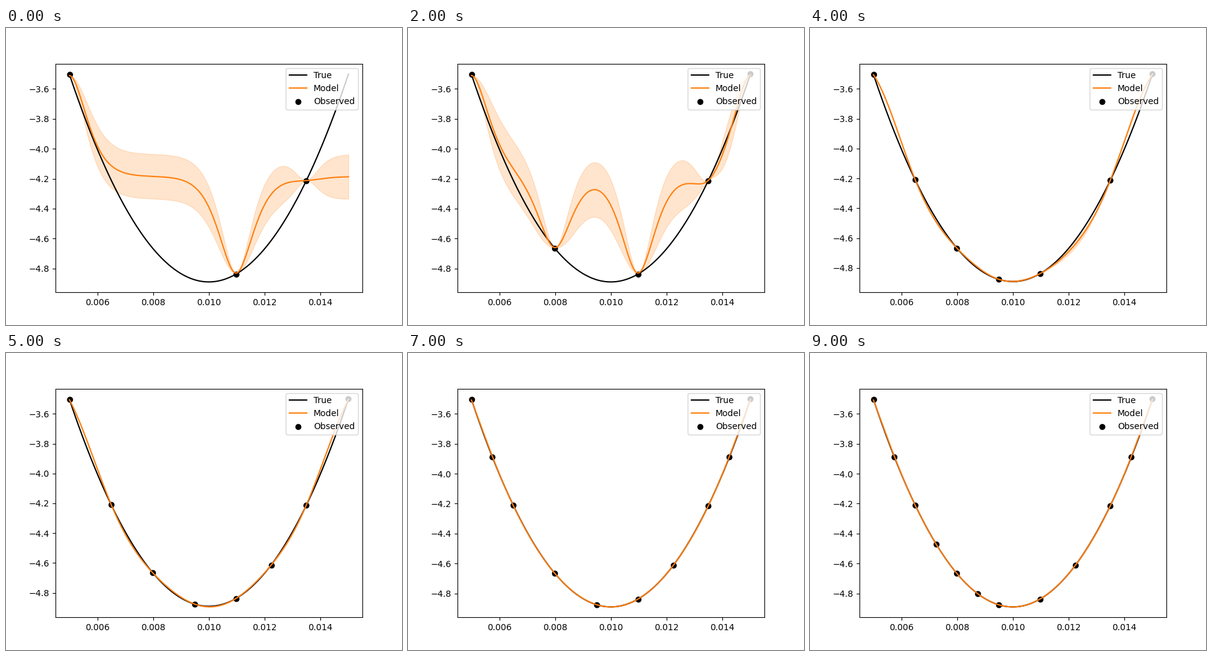
These frames come from a looping animation (640 by 480 pixels, 10 s). A matplotlib script:

```python
import numpy as np
import matplotlib.pyplot as plt
from matplotlib.animation import FuncAnimation

LOW, HIGH = 0.005, 0.015
STEPS = 10
START = 3

# first samples, as fractions of the x range
SEEDS = [0, 0.597, 0.849, 0.299, 1, 0.448]


def sample_positions(count):
    """The seeds, then the middle of the widest gap, leftmost first."""
    points = list(SEEDS)
    while len(points) < count:
        ordered = np.sort(points)
        i = np.argmax(np.round(np.diff(ordered), 6))
        points.append((ordered[i] + ordered[i + 1]) / 2)
    return np.array(points)


def to_x(u):
    return LOW + (HIGH - LOW) * u


def objective(x):
    return -4.89 + 55500 * (x - 0.009997) ** 2


def length_scale(step):
    """Short until the valley is sampled, then growing with the evidence."""
    if START + step < len(SEEDS):
        return 0.069
    return min(0.6, 0.16 * 1.4 ** (START + step - len(SEEDS)))


def matern(a, b, scale):
    s = np.sqrt(5) * np.abs(a[:, None] - b[None, :]) / scale
    return (1 + s + s * s / 3) * np.exp(-s)


def posterior(u, y, grid, scale):
    """Mean and band half-height of a Gaussian process on the grid."""
    noise = 5e-5 / scale ** 2
    dev = y - y.mean()
    k = matern(u, u, scale) + noise * np.eye(len(u))
    cross = matern(grid, u, scale)
    mean = y.mean() + cross @ np.linalg.solve(k, dev)
    var = 1 - np.sum(cross * np.linalg.solve(k, cross.T).T, axis=1)
    height = 0.1 + 0.055 * dev @ dev
    return mean, height * np.maximum(var, 0)


samples = sample_positions(START + STEPS - 1)
grid = np.linspace(0, 1, 201)
xs = to_x(grid)

fig, ax = plt.subplots(figsize=(6.4, 4.8), dpi=100)


def draw(step):
    u = samples[:START + step]
    y = objective(to_x(u))
    mean, half = posterior(u, y, grid, length_scale(step))

    ax.clear()
    ax.plot(xs, objective(xs), color="black", label="True")
    ax.plot(xs, mean, color="tab:orange", label="Model")
    ax.fill_between(xs, mean - half, mean + half, color="tab:orange", alpha=0.2)
    ax.scatter(to_x(u), y, color="black", label="Observed")
    ax.legend(loc="upper right")
    return []


anim = FuncAnimation(fig, draw, frames=STEPS, interval=1000,
                     init_func=lambda: draw(0), repeat=True)
plt.show()
```
